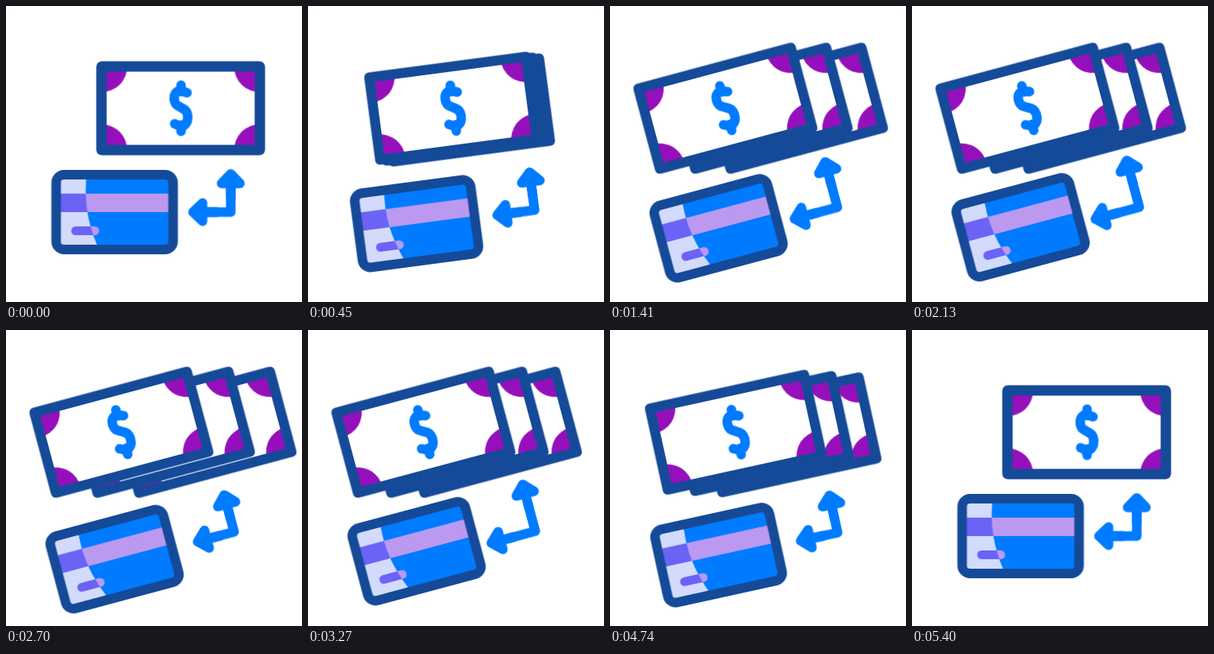
Write an HTML page that moves like this. It is 372x372 px and loops after 5430 ms.

```html
<!DOCTYPE html>
<html lang="en">
<head>
<meta charset="utf-8">
<title>Card and cash exchange</title>
<style>
  html, body { margin: 0; width: 100%; height: 100%; overflow: hidden; background: #fff; }
  svg { display: block; width: 100vw; height: 100vh; }

  .navy { stroke: #154a99; }
  .blue { stroke: #007bff; stroke-width: 12; stroke-linecap: round; stroke-linejoin: round; }
  .light { fill: #bb99f1; }
  .violet { fill: #6a63f6; }

  .cash, .copy, .card, .arrows, .up, .left {
    transform-origin: 0 0;
    animation: 5430ms cubic-bezier(.33, 0, .67, 1) infinite;
  }
  .cash { animation-name: cash; }
  .copy { animation-name: fan; }
  .card { animation-name: card; }
  .arrows { animation-name: turn; }
  .up { animation-name: reach; --x: 0px; --y: -18.5px; }
  .left { animation-name: reach; --x: -14px; --y: 0px; }
  .mid { --n: .5; }
  .back { --n: 1; }

  @keyframes cash {
    0%, 99.45%, 100% { transform: translateX(0) rotate(0deg); }
    16.575%, 82.87% { transform: translateX(-74.5px) rotate(-15deg); }
  }
  /* Copies slide out along a line that is level once the bills are tilted. */
  @keyframes fan {
    0%, 5.525%, 93.92%, 100% { transform: rotate(15deg) translateX(0px) rotate(-15deg); }
    16.575%, 17.68%, 81.77%, 82.87% { transform: rotate(15deg) translateX(calc(var(--n) * 106.5px)) rotate(-15deg); }
    33.15%, 66.3% { transform: rotate(15deg) translateX(calc(var(--n) * 74.5px)) rotate(-15deg); }
    49.72% { transform: rotate(15deg) translateX(calc(var(--n) * 104.5px)) rotate(-15deg); }
  }
  @keyframes card {
    0%, 99.45%, 100% { transform: translateY(0) rotate(0deg); }
    16.575%, 49.72%, 82.87% { transform: translateY(29px) rotate(-15deg); }
    33.15%, 66.3% { transform: translateY(14.7px) rotate(-15deg); }
  }
  @keyframes turn {
    0%, 99.45%, 100% { transform: translate(0px, 0px) rotate(0deg); }
    16.575%, 49.72%, 82.87% { transform: translate(0px, 0px) rotate(-15deg); }
    33.15%, 66.3% { transform: translate(-1.5px, -1.2px) rotate(-15deg); }
  }
  @keyframes reach {
    0%, 16.575%, 49.72%, 82.87%, 100% { transform: translate(0px, 0px); }
    33.15%, 66.3% { transform: translate(var(--x), var(--y)); }
  }
</style>
</head>
<body>
<svg viewBox="0 0 372 372">
  <defs>
    <path id="corner" d="M-99.25-52.25h32a32 32 0 0 1-32 32z" fill="#9510bb"/>
    <g id="bill">
      <rect x="-99.25" y="-52.25" width="198.5" height="104.5" fill="#fff"/>
      <use href="#corner"/>
      <use href="#corner" transform="scale(-1 1)"/>
      <use href="#corner" transform="scale(1 -1)"/>
      <use href="#corner" transform="scale(-1)"/>
      <rect x="-99.25" y="-52.25" width="198.5" height="104.5" fill="none" class="navy" stroke-width="12.5" stroke-linejoin="round"/>
    </g>
    <g id="marks">
      <rect x="-70" y="-23.2" width="140" height="23.2"/>
      <rect x="-54.5" y="18" width="35" height="11" rx="5.5"/>
    </g>
    <path id="shine" d="M-35.5-41Q-39.5-1-22 41H-70V-41z"/>
    <clipPath id="shineClip"><use href="#shine"/></clipPath>
  </defs>

  <g transform="translate(219.5 128.5)">
    <g class="cash">
      <use href="#bill" class="copy back"/>
      <use href="#bill" class="copy mid"/>
      <use href="#bill"/>
      <path class="blue" fill="none" d="M.5-29v8M.5 21v8M8-19.5L2-21.5C-9.5-24.5-10.5-8-4.5-3.8L4.5 1.5C12 6 10 24.5-1.5 22.5L-7.5 19.5"/>
    </g>
  </g>

  <g transform="translate(136.5 259)">
    <g class="card">
      <rect x="-70" y="-43" width="140" height="86" fill="#007bff"/>
      <use href="#marks" class="light"/>
      <g clip-path="url(#shineClip)">
        <use href="#shine" fill="#d2dbfb"/>
        <use href="#marks" class="violet"/>
      </g>
      <rect x="-73.5" y="-47" width="147" height="94" rx="10" fill="none" class="navy" stroke-width="12"/>
    </g>
  </g>

  <g transform="translate(264.5 240.5)">
    <g class="arrows blue" fill="#007bff">
      <path fill="none" d="M18-18V18.5H-18"/>
      <path class="up" d="M18 0V-17.5H6.5L18-29.5L29.5-17.5H18z"/>
      <path class="left" d="M0 18.5H-17.5V7L-29.5 18.5L-17.5 30V18.5z"/>
    </g>
  </g>
</svg>
</body>
</html>
```
